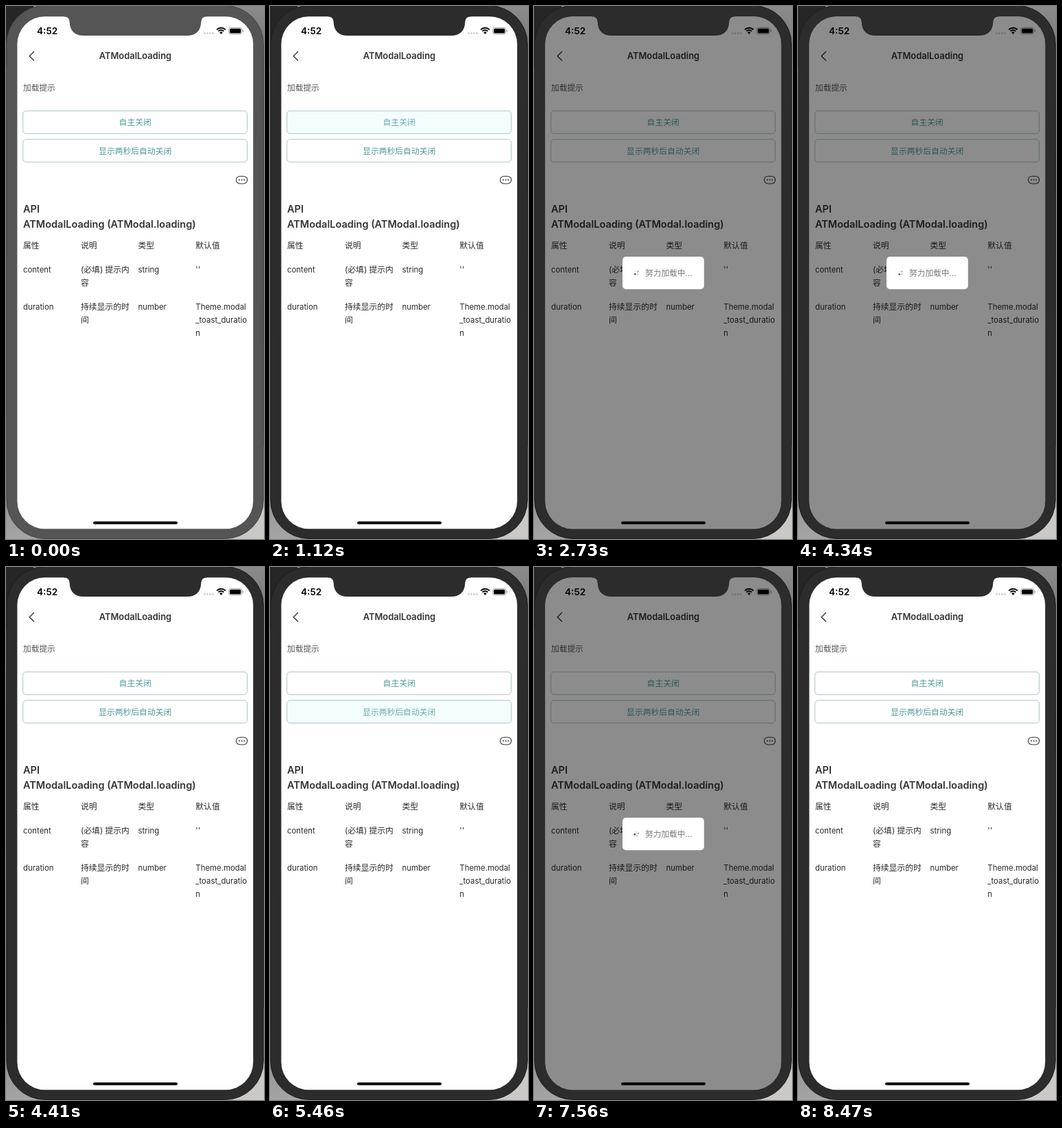
Write an HTML page with a canvas that moves like this. It is 376 px wide and 774 px high and loops after 8.82 s.

```html
<!DOCTYPE html>
<html lang="zh">
<head>
<meta charset="utf-8">
<title>Loading modal</title>
<style>
html, body { margin: 0; width: 100%; height: 100%; overflow: hidden; background: #777; }
canvas { display: block; width: 376px; height: 774px; }
</style>
</head>
<body>
<canvas id="stage"></canvas>
<script>
const W = 376, H = 774, LOOP = 8820, STEP = 70;
const FONT = 'Inter, "Noto Sans CJK SC", "Noto Sans CJK", sans-serif';
const FOCUS = 1120, SPIN = 810;

// Each showing: button index, press time, open and close times, spinner angle on opening
const shows = [
  { button: 0, press: 1120, open: 1260, close: 4410, angle: 203 },
  { button: 1, press: 5460, open: 5530, close: 7630, angle: 344 }
];

const buttons = [
  { y: 152.3, label: '自主关闭' },
  { y: 193.7, label: '显示两秒后自动关闭' }
];

const columns = [25, 109, 192.5, 276.3];
const rows = [
  { y: 352.2, cells: ['属性', '说明', '类型', '默认值'] },
  { y: 387.3, cells: ['content', '(必填) 提示内|容', 'string', "''"] },
  { y: 441.3, cells: ['duration', '持续显示的时|间', 'number', 'Theme.modal|_toast_duratio|n'] }
];

const canvas = document.getElementById('stage');
const ctx = canvas.getContext('2d');
const dpr = window.devicePixelRatio || 1;
canvas.width = W * dpr;
canvas.height = H * dpr;

function text(str, x, y, size, color, weight = 400, align = 'left') {
  ctx.font = `${weight} ${size}px ${FONT}`;
  ctx.textAlign = align;
  ctx.fillStyle = color;
  ctx.fillText(str, x, y);
}

function box(x, y, w, h, r, fill, stroke, line = 1) {
  ctx.beginPath();
  ctx.roundRect(x, y, w, h, r);
  if (fill) { ctx.fillStyle = fill; ctx.fill(); }
  if (stroke) { ctx.strokeStyle = stroke; ctx.lineWidth = line; ctx.stroke(); }
}

function dot(x, y, r, color) {
  ctx.beginPath();
  ctx.arc(x, y, r, 0, Math.PI * 2);
  ctx.fillStyle = color;
  ctx.fill();
}

function drawBackdrop() {
  const g = ctx.createLinearGradient(0, 0, 0, H);
  g.addColorStop(0, '#8b8b8b');
  g.addColorStop(0.3, '#4a4a4a');
  g.addColorStop(0.8, '#777');
  g.addColorStop(1, '#a5a5a5');
  ctx.fillStyle = g;
  ctx.fillRect(0, 0, W, H);
  ctx.fillStyle = '#262626';
  ctx.fillRect(0, 0, 40, 90);
  ctx.fillStyle = '#cbc9c6';
  ctx.fillRect(320, 640, 56, 134);
}

function notch(color) {
  ctx.beginPath();
  ctx.moveTo(84, 14);
  ctx.lineTo(84, 15.3);
  ctx.quadraticCurveTo(92.3, 15.5, 92.6, 22.5);
  ctx.bezierCurveTo(93, 36, 100, 43, 113, 43);
  ctx.lineTo(264, 43);
  ctx.bezierCurveTo(277, 43, 284, 36, 284.4, 22.5);
  ctx.quadraticCurveTo(284.7, 15.5, 293, 15.3);
  ctx.lineTo(293, 14);
  ctx.closePath();
  ctx.fillStyle = color;
  ctx.fill();
}

function drawStatus() {
  text('4:52', 45, 41, 13.6, '#000', 600);
  for (let i = 0; i < 4; i++) dot(289.5 + i * 4, 39.6, 1.3, '#c8c8c8');

  ctx.strokeStyle = '#000';
  ctx.lineWidth = 1.9;
  for (const r of [5.6, 8.9]) {
    ctx.beginPath();
    ctx.arc(313.5, 40.6, r, -Math.PI * 0.755, -Math.PI * 0.245);
    ctx.stroke();
  }
  ctx.beginPath();
  ctx.moveTo(313.5, 41);
  ctx.arc(313.5, 40.6, 3.1, -Math.PI * 0.76, -Math.PI * 0.24);
  ctx.closePath();
  ctx.fillStyle = '#000';
  ctx.fill();

  box(324.7, 31.4, 19, 9.4, 2.7, null, '#999', 0.9);
  box(326.1, 32.8, 16.2, 6.6, 1.5, '#000');
  box(344.7, 34.4, 1.2, 3.4, 0.6, '#999');
}

function drawChatIcon() {
  box(335.6, 247.2, 16, 10.8, 5.2, null, '#333', 1.1);
  for (let i = -1; i <= 1; i++) dot(343.6 + i * 3.6, 252.6, 1, '#333');
}

function drawPage(pressed) {
  drawStatus();
  ctx.beginPath();
  ctx.moveTo(41, 66);
  ctx.lineTo(34.2, 72.8);
  ctx.lineTo(41, 79.6);
  ctx.strokeStyle = '#333';
  ctx.lineWidth = 1.4;
  ctx.stroke();
  text('ATModalLoading', 188.4, 77.4, 12.9, '#333', 600, 'center');
  text('加载提示', 25, 123, 11.7, '#555');

  buttons.forEach((b, i) => {
    const on = i === pressed;
    box(24.7, b.y, 326.8, 33, 4.5, on ? '#f3fdfd' : '#fff', '#adc3c6');
    text(b.label, 188.2, b.y + 20.8, 11.8, on ? '#69a8ab' : '#4f989b', 400, 'center');
  });
  drawChatIcon();

  text('API', 25, 300, 14.5, '#333', 600);
  text('ATModalLoading (ATModal.loading)', 25, 322, 14.5, '#333', 600);
  for (const row of rows) {
    row.cells.forEach((cell, c) => {
      const size = /[^\x00-\x7f]/.test(cell) ? 11.8 : 11.4;
      cell.split('|').forEach((str, n) => text(str, columns[c], row.y + n * 18.6, size, '#2a2a2a'));
    });
  }
  box(127, 748.4, 123, 4, 2, '#000');
}

function drawSpinner(deg) {
  ['#4c4c4c', '#e6e6e6', '#b4b4b4', '#d0d0d0'].forEach((color, i) => {
    const a = (deg + i * 90) * Math.PI / 180;
    dot(149.4 + 2.7 * Math.cos(a), 387.5 + 2.7 * Math.sin(a), 1.35, color);
  });
}

function drawModal(show, t) {
  const age = t - show.open;
  const scale = age < 140 ? 1 - 0.18 * Math.pow(1 - age / 140, 2.5) : 1;
  ctx.fillStyle = 'rgba(0,0,0,.45)';
  ctx.fillRect(0, 0, W, H);
  ctx.save();
  ctx.translate(188.4, 424);
  ctx.scale(scale, scale);
  ctx.translate(-188.4, -424);
  box(129, 364, 118.8, 47.3, 5, '#fff');
  drawSpinner(show.angle + age / SPIN * 360);
  text('努力加载中...', 162, 391.8, 11.7, '#777');
  ctx.restore();
}

function draw(t) {
  const bezel = t < FOCUS ? '#555' : '#2c2c2c';
  const show = shows.find(s => t >= s.press && t < s.close);
  const open = show && t >= show.open;

  ctx.setTransform(dpr, 0, 0, dpr, 0, 0);
  drawBackdrop();
  box(0.8, -0.5, 374.4, 774, 56, bezel, t < FOCUS ? '#444' : '#1c1c1c');

  ctx.save();
  ctx.beginPath();
  ctx.roundRect(16.4, 15.2, 343.8, 744, 40);
  ctx.clip();
  ctx.fillStyle = '#fff';
  ctx.fillRect(0, 0, W, H);
  drawPage(show && !open ? show.button : -1);
  if (open) drawModal(show, t);
  ctx.restore();
  notch(bezel);
}

const start = performance.now();
function tick() {
  const t = (performance.now() - start) % LOOP;
  draw(Math.floor(t / STEP) * STEP);
  requestAnimationFrame(tick);
}
tick();
</script>
</body>
</html>
```
